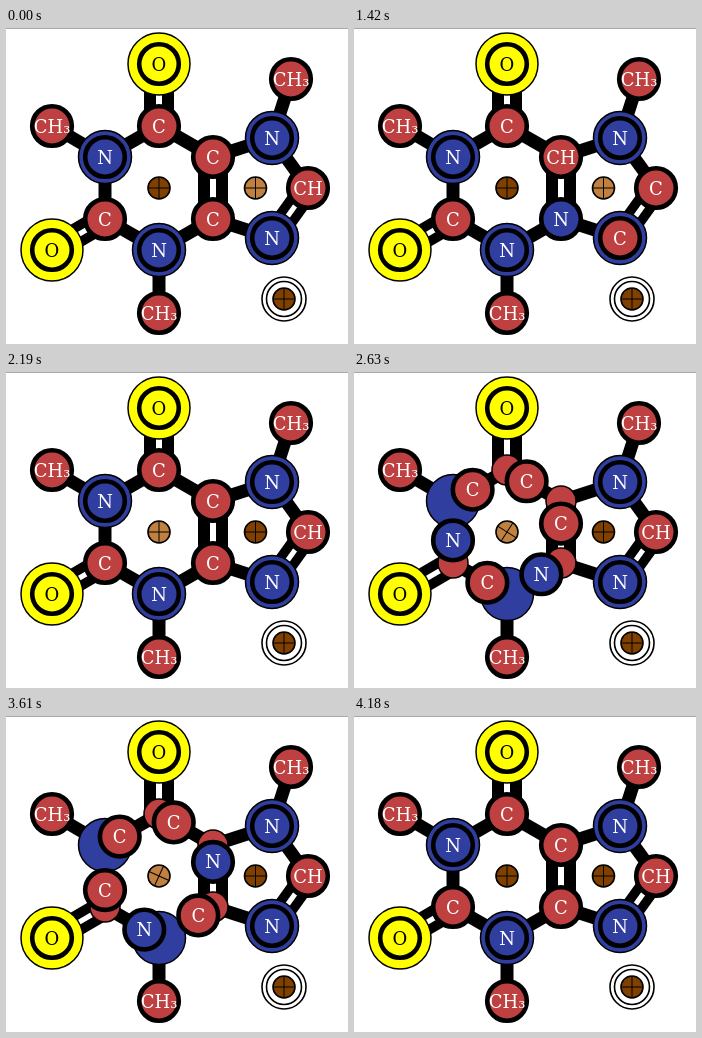
Write an HTML page with a canvas that moves like this. It is 342 px wide and 316 px high and loops after 4560 ms.

```html
<!DOCTYPE html>
<html>
<head>
<meta charset="utf-8">
<style>
html, body { margin: 0; width: 342px; height: 316px; overflow: hidden; background: #fff; }
canvas { display: block; }
</style>
</head>
<body>
<canvas id="stage" width="342" height="316"></canvas>
<script>
const ctx = document.getElementById("stage").getContext("2d");
const RED = "#bf4040", BLUE = "#303f9f", YELLOW = "#ffff00";
const DARK = "#804000", LIGHT = "#c08040";
const LOOP = 4560, STEP = 30;

// Corners of both rings, each listed clockwise; two are shared.
const top6 = [153, 98], shareA = [207, 129], shareB = [207, 191],
  low6 = [153, 222], left6 = [99, 191], upLeft6 = [99, 129],
  up5 = [266, 110], tip5 = [302, 160], low5 = [266, 210];
const hexagon = [top6, shareA, shareB, low6, left6, upLeft6];
const pentagon = [shareA, up5, tip5, low5, shareB];
const labels = new Map([
  [top6, "C"], [shareA, "C"], [shareB, "C"], [low6, "N"], [left6, "C"],
  [upLeft6, "N"], [up5, "N"], [tip5, "CH"], [low5, "N"]
]);
const oxygens = [[153, 36], [46, 222]];
const methyls = [[46, 98], [153, 285], [285, 51]];

const bonds = [
  [upLeft6, top6], [top6, shareA], [shareB, low6], [low6, left6], [left6, upLeft6],
  [shareA, up5], [up5, tip5], [low5, shareB],
  [upLeft6, methyls[0]], [low6, methyls[1]], [up5, methyls[2]]
];
const doubleBonds = [
  [top6, oxygens[0], 30, 6], [shareA, shareB, 30, 6],
  [left6, oxygens[1], 25, 5], [tip5, low5, 24, 5]
];

// Each turn: start, duration, direction (-1 is counterclockwise).
const pentTurns = [[420, 160, -1], [910, 160, -1], [1420, 180, 1], [2020, 170, 1]];
const hexTurns = [[2520, 170, -1], [3020, 170, -1], [3550, 170, 1], [3990, 170, 1]];

function turnAt(turns, t) {
  let sum = 0;
  for (const [start, length, dir] of turns) {
    if (t < start) break;
    const n = t - start >= length ? 6 : Math.floor((t - start) / STEP);
    sum += dir * Math.min(1, Math.max(0, (2 * n - dir) / 11));
  }
  return sum;
}

function line([x1, y1], [x2, y2], width, color = "#000") {
  ctx.beginPath();
  ctx.moveTo(x1, y1);
  ctx.lineTo(x2, y2);
  ctx.lineWidth = width;
  ctx.strokeStyle = color;
  ctx.stroke();
}

function disc([x, y], r, fill, width) {
  ctx.beginPath();
  ctx.arc(x, y, r, 0, 2 * Math.PI);
  ctx.fillStyle = fill;
  ctx.fill();
  ctx.lineWidth = width;
  ctx.strokeStyle = "#000";
  ctx.stroke();
}

function atom(p, label, fill, ink = "#fff") {
  disc(p, 19.8, fill, 4.6);
  ctx.fillStyle = ink;
  ctx.fillText(label, p[0], p[1] + 6.5);
}

function knob([x, y], fill, angle = 0) {
  disc([x, y], 11, fill, 1.6);
  ctx.save();
  ctx.translate(x, y);
  ctx.rotate(angle);
  line([-11, 0], [11, 0], 1);
  line([0, -11], [0, 11], 1);
  ctx.restore();
}

function along(ring, pos) {
  const n = ring.length, i = Math.floor(pos), f = pos - i;
  const a = ring[(i + n) % n], b = ring[(i + 1 + n) % n];
  return [a[0] + (b[0] - a[0]) * f, a[1] + (b[1] - a[1]) * f];
}

function draw(t) {
  const pentTurn = turnAt(pentTurns, t), hexTurn = turnAt(hexTurns, t);
  ctx.fillStyle = "#fff";
  ctx.fillRect(0, 0, 342, 316);
  ctx.fillStyle = "#aaa";
  ctx.fillRect(0, 0, 342, 1);
  ctx.font = "18px 'DejaVu Serif', 'Noto Serif', serif";
  ctx.textAlign = "center";

  for (const [a, b] of bonds) line(a, b, 13);
  for (const [a, b, width, gap] of doubleBonds) {
    line(a, b, width);
    line(a, b, gap, "#fff");
  }

  for (const [p, label] of labels) {
    const blue = label === "N";
    disc(p, blue ? 26.5 : 15, blue ? BLUE : RED, 1.5);
  }
  for (const p of oxygens) {
    disc(p, 31, YELLOW, 1.5);
    atom(p, "O", YELLOW, "#000");
  }
  for (const p of methyls) atom(p, "CH₃", RED);

  const places = new Map([...labels.keys()].map(p => [p, p]));
  for (const [ring, turn] of [[pentagon, pentTurn], [hexagon, hexTurn]])
    if (turn) ring.forEach((p, i) => places.set(p, along(ring, i + turn)));
  for (const [p, label] of labels)
    atom(places.get(p), label, label === "N" ? BLUE : RED);

  knob([153, 160], t >= 2190 && t < 4180 ? LIGHT : DARK, hexTurn * Math.PI / 2);
  knob([249.5, 160], t < 2190 ? LIGHT : DARK, pentTurn * Math.PI / 2);
  disc([278, 271], 22, "#fff", 1.6);
  disc([278, 271], 17.5, "#fff", 1.6);
  knob([278, 271], DARK);
}

const begin = performance.now();
function tick() {
  draw((performance.now() - begin) % LOOP);
  requestAnimationFrame(tick);
}
tick();
</script>
</body>
</html>
```
